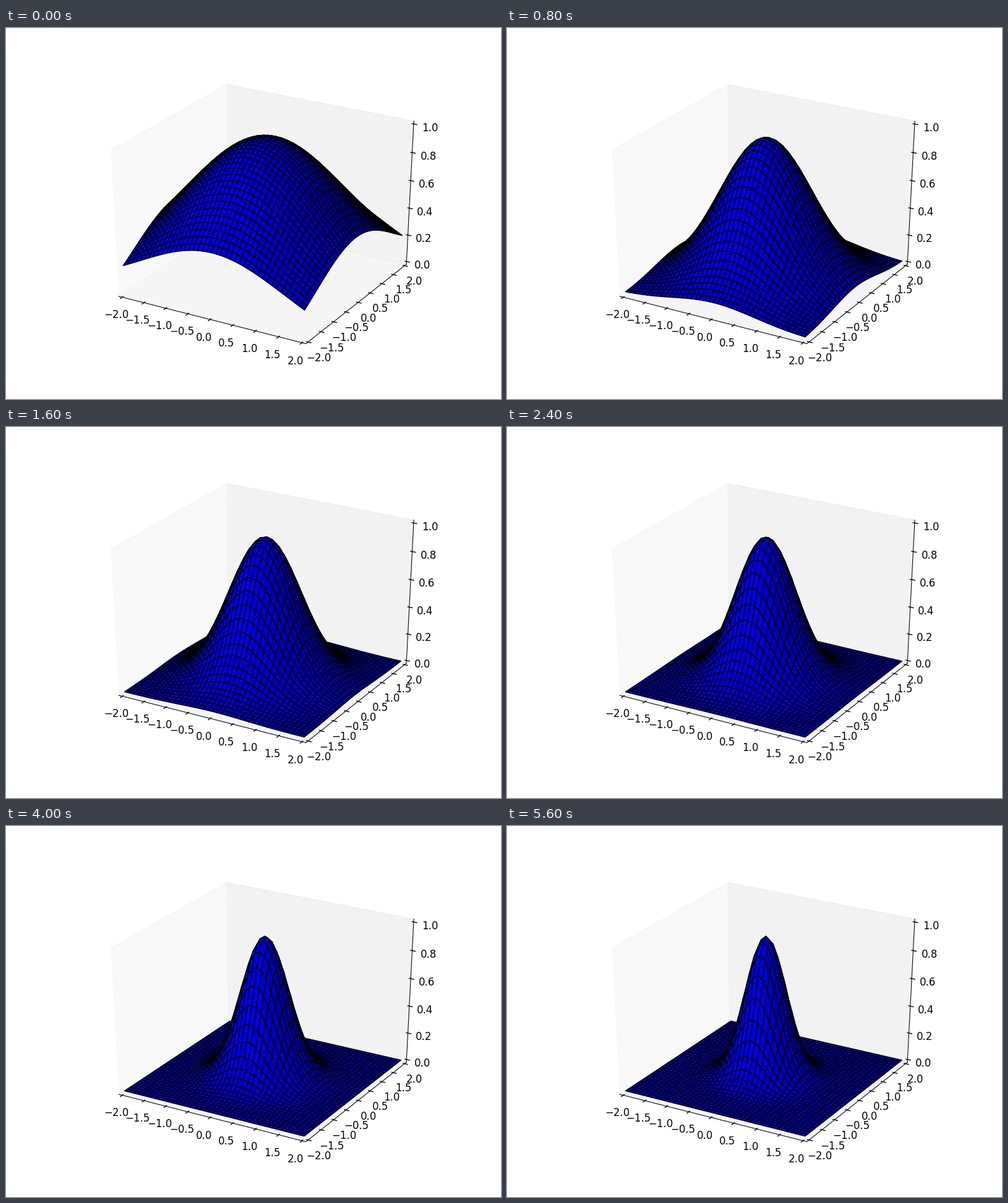
A matplotlib script for the animation above (5800 ms loop, 800 px wide and 600 px high).

```python
import numpy as np
import matplotlib.pyplot as plt
from matplotlib.animation import FuncAnimation
from matplotlib.collections import PolyCollection
from matplotlib.patches import Polygon

plt.rcParams["font.family"] = "DejaVu Sans"

FRAMES, INTERVAL = 29, 200
DIST = 10
ELEV, AZIM = np.radians(30), np.radians(-60)
EDGE = 0.5 + 1 / 48      # half size of the box, with margin
DELTA = 1 / 12
PAD = 0.7 * DELTA        # label offset from the box

# Camera basis: right, up, towards the eye
EYE = np.array([np.cos(ELEV) * np.cos(AZIM), np.cos(ELEV) * np.sin(AZIM), np.sin(ELEV)])
RIGHT = np.array([-np.sin(AZIM), np.cos(AZIM), 0])
UP = np.cross(EYE, RIGHT)


def project(p):
    """Perspective view of points in the centred unit cube, plus nearness."""
    p = np.asarray(p, float)
    near = 1 / (DIST - p @ EYE)
    return np.stack([p @ RIGHT * near, p @ UP * near], axis=-1), near


fig = plt.figure(figsize=(8, 6), dpi=100, facecolor="white")
ax = fig.add_axes([0.125, 0.1, 0.775, 0.8])
ax.set_xlim(-0.095, 0.09)
ax.set_ylim(-0.095, 0.09)
ax.axis("off")


def pane(corners, grey):
    xy, _ = project(np.array(corners) * EDGE)
    ax.add_patch(Polygon(xy, closed=False, facecolor=(grey,) * 3, edgecolor=(grey,) * 3,
                         alpha=0.5, linewidth=1, clip_on=False, zorder=1))


def line(p, q, width):
    xy, _ = project([p, q])
    ax.plot(xy[:, 0], xy[:, 1], color="black", lw=width, clip_on=False, zorder=2)


def axis(index, tick_dir, base, values, spots):
    """Axis line along one box edge with its ticks and labels."""
    base = np.array(base) * EDGE
    ends = np.array([base, base])
    ends[:, index] = -EDGE, EDGE
    line(*ends, 0.75)
    for value, spot in zip(values, spots):
        pos = base.copy()
        pos[index] = spot
        out = np.zeros(3)
        out[tick_dir] = np.sign(base[tick_dir]) * DELTA
        line(pos - 0.1 * out, pos + 0.2 * out, 1)
        (x, y), _ = project(pos + np.sign(base) * PAD)
        ax.text(x, y, f"{value:.1f}".replace("-", "\u2212"), size=12,
                ha="center", va="top", zorder=2.5)


pane([(-1, -1, -1), (-1, 1, -1), (-1, 1, 1), (-1, -1, 1)], 0.95)
pane([(-1, 1, -1), (1, 1, -1), (1, 1, 1), (-1, 1, 1)], 0.90)
pane([(-1, -1, -1), (1, -1, -1), (1, 1, -1), (-1, 1, -1)], 0.925)

flat = np.linspace(-2, 2, 9)
tall = np.linspace(0, 1, 6)
axis(0, 1, (0, -1, -1), flat, flat / 4)
axis(1, 0, (1, 0, -1), flat, flat / 4)
axis(2, 0, (1, 1, 0), tall, tall - 0.5)

grid = np.linspace(-2, 2, 41)
X, Y = np.meshgrid(grid, grid)
LIGHT = np.array([-1, -1, 0.5])

surface = PolyCollection([], edgecolors="black", linewidths=1, clip_on=False, zorder=3)
ax.add_collection(surface, autolim=False)


def quads(p):
    """Corner points of every grid cell, counter-clockwise."""
    cells = np.stack([p[:-1, :-1], p[:-1, 1:], p[1:, 1:], p[1:, :-1]], axis=2)
    return cells.reshape(-1, 4, 3)


def shades(cells):
    normal = np.cross(cells[:, 0] - cells[:, 1], cells[:, 1] - cells[:, 2])
    normal /= np.linalg.norm(normal, axis=1, keepdims=True)
    s = normal @ LIGHT
    return 0.5 + 0.5 * (s - s.min()) / (s.max() - s.min())


def update(i):
    Z = np.exp(-(0.2 + 0.1 * i) * (X**2 + Y**2))
    cells = quads(np.stack([X, Y, Z], axis=-1))
    xy, near = project(cells / [4, 4, 1] - [0, 0, 0.5])
    order = np.argsort(near.mean(axis=1), kind="stable")
    colors = np.zeros((len(cells), 4))
    colors[:, 2] = shades(cells)
    colors[:, 3] = 1
    surface.set_verts(xy[order])
    surface.set_facecolor(colors[order])
    return surface,


anim = FuncAnimation(fig, update, frames=FRAMES, interval=INTERVAL,
                     repeat=True, repeat_delay=0, blit=False)
plt.show()
```
